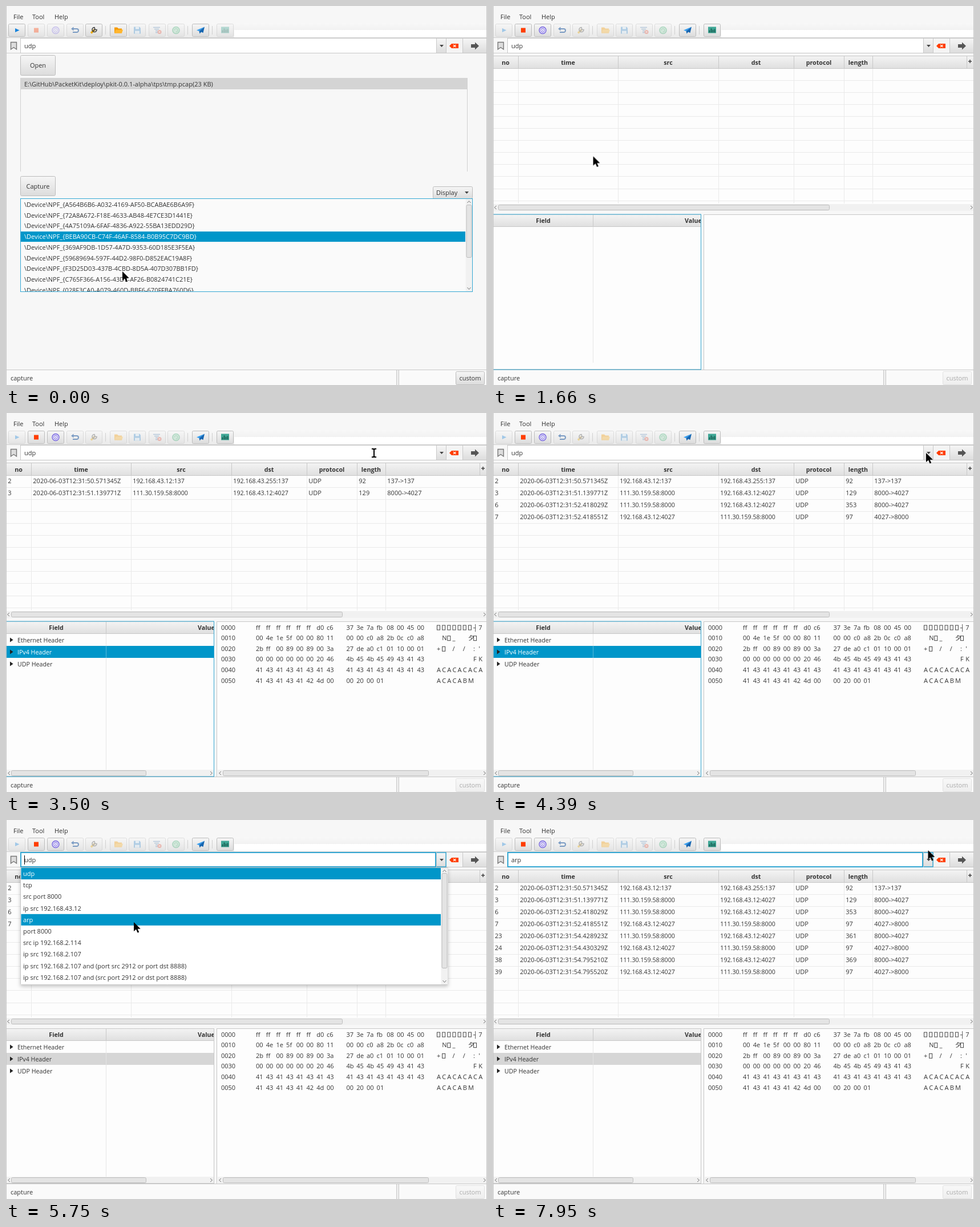
An HTML page for the animation above (8000 ms loop, 843 by 664 pixels).

```html
<!DOCTYPE html>
<html lang="en">
<head>
<meta charset="utf-8">
<title>Packet capture</title>
<style>
html, body { margin: 0; width: 100%; height: 100%; overflow: hidden; background: #f7f7f7; }
svg { display: block; }
text { font: 11px "Open Sans", "Noto Sans", sans-serif; fill: #333; white-space: pre; }
.bold { font-weight: 700; font-size: 10.7px; }
.ip, .tree { font-size: 10.65px; }
.inv { fill: #fff; }
.mid { text-anchor: middle; }
.dim { opacity: .4; }
</style>
</head>
<body>
<svg id="stage" width="843" height="664" viewBox="0 0 843 664" xmlns="http://www.w3.org/2000/svg"></svg>
<script>
const LOOP = 8000, STEP = 120, BLUE = '#0096c9', FOCUS = '#35a8d4', LINE = '#c8c8c8';

// drawing helpers, all return SVG markup
const box = (x, y, w, h, fill, more = '') => `<rect x="${x}" y="${y}" width="${w}" height="${h}" fill="${fill}" ${more}/>`;
const frame = (x, y, w, h, fill, stroke = LINE, r = 0) =>
  box(x + .5, y + .5, w - 1, h - 1, fill, `stroke="${stroke}" rx="${r}"`);
const path = (d, fill = 'none', more = '') => `<path d="${d}" fill="${fill}" ${more}/>`;
const line = (d, color, w = 1) => path(d, 'none', `stroke="${color}" stroke-width="${w}"`);
const disc = (r, fill, more = '') => `<circle r="${r}" fill="${fill}" ${more}/>`;
const label = (x, y, s, cls = '') => `<text x="${x}" y="${y + 4}" class="${cls}">${s}</text>`;
const group = (s, more = '') => `<g ${more}>${s}</g>`;
const at = (x, y, s) => group(s, `transform="translate(${x} ${y})"`);
const clip = (x, y, w, h, s) => `<svg x="${x}" y="${y}" width="${w}" height="${h}" viewBox="${x} ${y} ${w} ${h}">${s}</svg>`;
const button = (x, y, w, h, s = '') => frame(x, y, w, h, 'url(#face)', '#bcbcbc', 2) +
  (s && label(x + w / 2, y + h / 2, s, 'mid'));
const chevron = (x, y, turn) => path('M-2 -3L1.5 0L-2 3', 'none',
  `stroke="#777" transform="translate(${x} ${y}) rotate(${turn})"`);
const thumb = (x, y, w, h) => frame(x, y, w, h, '#e4e4e4', '#bdbdbd', 2);
const hbar = (x, y, w, from, to) => box(x, y, w, 12, '#f1f1f1') + chevron(x + 4, y + 6, 180) +
  chevron(x + w - 4, y + 6, 0) + thumb(from, y + 1, to - from, 10);
const vbar = (x, y, h, from, to) => box(x, y, 12, h, '#f1f1f1') + chevron(x + 6, y + 5, -90) +
  chevron(x + 6, y + h - 5, 90) + thumb(x + 1, from, 10, to - from);
const fade = (id, a, b) => `<linearGradient id="${id}" x2="0" y2="1"><stop stop-color="${a}"/><stop offset="1" stop-color="${b}"/></linearGradient>`;

const defs = '<defs>' + fade('face', '#f6f6f6', '#dcdcdc') + fade('head', '#f3f3f3', '#e0e0e0') +
  fade('bar', '#f8f8f8', '#eaeaea') + `<filter id="shadow" x="-5%" y="-5%" width="110%" height="115%">
  <feDropShadow dx="0" dy="3" stdDeviation="3" flood-opacity=".22"/></filter></defs>`;

// toolbar icons, centred on 0,0
const play = path('M-3 -3.5L4.5 0L-3 3.5Z', '#1583dc');
const stop = box(-4, -4, 8, 8, '#ff3d00');
const rings = disc(6, '#e3defc', 'stroke="#7564dd" stroke-width="1.4"') + disc(3.2, '#fff', 'stroke="#7564dd"') + disc(1, '#7564dd');
const undo = line('M-4 -2.5H3a3 3 0 0 1 0 6H-4', '#3f71ad', 2) + path('M-7 -2.5L-2.5 -6V1Z', '#3f71ad');
const wrench = line('M-5 5L1 -1', '#e9a800', 3.4) + line('M-2 2L2 -2M1 -5a4 4 0 1 0 4 4L2 -1Z', '#444', 1.6);
const folder = path('M-7 -5H-2L0 -3H6V5H-7Z', '#f59a00') + path('M-7 5L-5 -1H8L6 5Z', '#ffb62e');
const save = path('M-6 -6H4L6 -4V6H-6Z', '#3d8fd1') + box(-3, -6, 6, 4, '#d8ecfa') + box(-4, 1, 8, 5, '#d8ecfa');
const clear = line('M-7 -5H5M-5 -2H3M-3 1H1M-3 4H1', '#4a7fb5', 1.6) +
  at(4, 3, disc(3.5, '#e5533d') + line('M-1.5 -1.5L1.5 1.5M1.5 -1.5L-1.5 1.5', '#fff'));
const reload = disc(6, '#9fdcb8', 'stroke="#35a86b" stroke-width="1.6"') + line('M-3 0A3 3 0 1 1 0 3', '#35a86b');
const plane = path('M7 -6L-7 0L-2.5 1.6Z', '#2f9bf0') + path('M7 -6L-2.5 1.6L-1.5 6L1 3L4.5 4.5Z', '#1565b0');
const chart = box(-7, -6, 14, 11, '#3fa796') + line('M-4.5 4V0M-1.5 4V-3M1.5 4V-1M4.5 4V-2', '#14574c', 1.6);

const tools = [play, stop, rings, undo, wrench, folder, save, clear, reload, plane, chart];
const toolX = [4, 38, 72, 106, 139, 182, 215, 250, 283, 326, 369];
const toolbar = (...on) => tools.map((icon, i) => {
  const live = on.includes(icon);
  return group(button(toolX[i], 31, 30, 23), live ? '' : 'opacity=".45"') +
    group(at(toolX[i] + 15, 42.5, icon), live ? '' : `opacity="${icon == undo ? .65 : .35}"`);
}).join('');

const chrome = box(0, 0, 843, 664, '#f7f7f7') +
  label(13, 18.5, 'File') + label(46, 18.5, 'Tool') + label(85, 18.5, 'Help') +
  box(0, 30, 843, 25, 'url(#bar)') + box(400, 42, 443, 13, '#fff') +
  [174, 318, 361].map(x => box(x, 35, 1, 15, '#d0d0d0')).join('');

const filterRow = box(0, 55, 843, 1, '#cfcfcf') + box(0, 82, 843, 1, '#cfcfcf') +
  path('M8.5 63.5H18.5V76L13.5 72.5L8.5 76Z', '#ddd', 'stroke="#777" stroke-width="1.4"') +
  frame(25, 56, 730, 27, '#fff') + frame(754, 56, 18, 27, 'url(#face)') +
  path('M760 68H767L763.5 72Z', '#444') +
  frame(771, 56, 30, 27, '#f4f4f4') + path('M777 70L781 66H793V74H781Z', '#ff3d00') +
  line('M784 68L788.5 72M788.5 68L784 72', '#fff', 1.3) +
  frame(800, 56, 43, 27, 'url(#face)') +
  path('M815 67H822V63.5L829 70L822 76.5V73H815Z', '#555') +
  group(box(26, 57, 727, 25, 'none', `stroke="${FOCUS}" stroke-width="2"`) +
    line('M755 57H771V82H755', FOCUS, 1.4), 'id="focus"') +
  group(label(32, 70, 'udp'), 'id="udp"') + group(label(32, 70, 'arp'), 'id="arp"') +
  box(32, 62, 1, 16, '#000', 'id="caret"');

const status = box(0, 637, 843, 1, LINE) + box(0, 638, 843, 26, '#fafafa') + label(8, 651.5, 'capture') +
  box(684, 638, 5, 26, '#eee') + box(684, 638, 1, 26, LINE) + box(688, 638, 1, 26, LINE);

// start view
const devices = ['A564B6B6-A032-4169-AF50-BCABAE6B6A9F', '72A8A672-F18E-4633-AB48-4E7CE3D1441E',
  '4A75109A-6FAF-4836-A922-55BA13EDD29D', 'BEBA90CB-C74F-46AF-8584-B0B95C7DC9BD',
  '369AF9DB-1D57-4A7D-9353-60D185E3F5EA', '59689694-597F-44D2-98F0-D852EAC19A8F',
  'F3D25D03-437B-4CBD-8D5A-407D307BB1FD', 'C765F366-A156-43D7-AF26-B0824741C21E',
  '028F3CA0-A079-460D-BBF6-670FFBA760D6'].map(id => `\\Device\\NPF_{${id}}`);
const deviceY = i => 348 + i * 18.7;
const picked = i => group(box(26, deviceY(i) - 9, 779, 18, BLUE) + label(32, deviceY(i), devices[i], 'inv'), `id="pick${i}"`);

const startView = toolbar(play, wrench, folder, plane) + button(25, 86, 62, 36, 'Open') +
  box(25, 126, 784, 20, '#d4d4d4') + label(32, 136.5, 'E:\\GitHub\\PacketKit\\deploy\\pkit-0.0.1-alpha\\tps\\tmp.pcap(23 KB)') +
  box(25, 146, 1, 144, '#d0d0d0') + box(808, 146, 1, 144, '#d0d0d0') +
  button(25, 298, 62, 35, 'Capture') + button(748, 316, 70, 22) + label(754, 327, 'Display') +
  path('M804 325H811L807.5 329Z', '#444') +
  box(25, 338, 793, 162, '#fafafa') +
  clip(25, 338, 793, 162, devices.map((d, i) => label(32, deviceY(i), d)).join('') + picked(3) + picked(7)) +
  vbar(805.5, 338, 162, 348, 441) + frame(25, 337, 793, 164, 'none', FOCUS) +
  button(788, 640, 51, 24, 'custom');

// capture view
const cols = [0, 44, 219, 395, 527, 615, 665, 830];
const names = ['no', 'time', 'src', 'dst', 'protocol', 'length'];
const A = '192.168.43.12', B = '111.30.159.58:8000', C = A + ':4027';
const up = [C, B, 97, '4027->8000'];
const down = size => [B, C, size, '8000->4027'];
const packets = [
  [2380, 2, '50.571345', A + ':137', '192.168.43.255:137', 92, '137->137'],
  [3010, 3, '51.139771', ...down(129)],
  [4250, 6, '52.418029', ...down(353)],
  [4250, 7, '52.418551', ...up],
  [6150, 23, '54.428923', ...down(361)],
  [6150, 24, '54.430329', ...up],
  [6150, 38, '54.795210', ...down(369)],
  [6150, 39, '54.795520', ...up]
];
const row = ([, no, sec, src, dst, len, info], i) => {
  const cells = [no, `2020-06-03T12:31:${sec}Z`, src, dst, 'UDP', len, info];
  return group(cells.map((s, c) => label(cols[c] + 3.3, 118.5 + i * 21.1, s, c == 2 || c == 3 ? 'ip' : '')).join(''), `id="row${i}"`);
};

let table = box(0, 87, 843, 272, '#fdfdfd') + box(0, 88, 843, 21, 'url(#head)') +
  box(0, 87, 843, 1, LINE) + box(0, 109, 843, 1, LINE);
for (let i = 1; i < 12; i++) table += box(0, 109 + Math.round(i * 21.05), 843, 1, '#eaeaea');
cols.slice(1).forEach((x, i) => {
  table += box(x, 88, 1, 21, LINE);
  if (i < 6) table += box(x, 110, 1, 236, '#eaeaea');
});
names.forEach((s, i) => table += label((cols[i] + cols[i + 1]) / 2, 98.5, s, 'bold mid'));
table += line('M833 97H839M836 94V100', '#444', 1.5) + packets.map(row).join('') + hbar(0, 347, 843, 9, 590);

const fields = ['Ethernet Header', 'IPv4 Header', 'UDP Header'];
const fieldY = i => 397.5 + i * 21;
const split = (fill, cls) => box(1, 408, 363, 21, fill) + box(175, 408, 1, 21, '#fff', 'opacity=".35"') + label(20, fieldY(1), fields[1], cls);
const tree = box(0, 365, 365, 272, '#fdfdfd') + box(0, 366, 365, 20, 'url(#head)') + box(0, 386, 365, 1, LINE) +
  box(175, 366, 1, 20, LINE) + box(175, 387, 1, 238, '#e6e6e6') + label(88, 376, 'Field', 'bold mid') +
  clip(176, 366, 188, 20, label(336, 376, 'Value', 'bold')) +
  group(fields.map((s, i) => label(20, fieldY(i), s, 'tree')).join('') +
    group(split('#d6d6d6', 'tree'), 'id="idle"') + group(split(BLUE, 'tree inv'), 'id="hot"') +
    fields.map((s, i) => at(7, fieldY(i), path('M0 -4L5.5 0L0 4Z', '#222'))).join('') +
    hbar(1, 625, 363, 9, 246), 'class="filled"') +
  frame(0, 365, 365, 272, 'none') + group(frame(0, 364.5, 365, 273, 'none', FOCUS), 'id="treeFocus"');

// '#' stands for an unprintable byte
const AC = '41 43 41 43 41 43 41 43';
const hexLine = (i, left, right, chars) => {
  const y = 375.5 + i * 18.65;
  const bytes = (s, x) => s.split(' ').map((b, k) => label(x + k * 17.7, y, b)).join('');
  return label(377, y, `00${i}0`) + bytes(left, 438) + bytes(right, 596.5) + [...chars].map((c, k) => {
    const x = 755 + k * 9.15;
    return c == '#' ? frame(x, y - 4, 6, 9, 'none', '#444') : c == ' ' ? '' : label(x, y, c);
  }).join('');
};
const dump = hexLine(0, 'ff ff ff ff ff ff d0 c6', '37 3e 7a fb 08 00 45 00', '#######┤7') +
  hexLine(1, '00 4e 1e 5f 00 00 80 11', '00 00 c0 a8 2b 0c c0 a8', ' N#_  夕#') +
  hexLine(2, '2b ff 00 89 00 89 00 3a', '27 de a0 c1 01 10 00 01', "+# / / :'") +
  hexLine(3, '00 00 00 00 00 00 20 46', '4b 45 4b 45 49 43 41 43', '       FK') +
  hexLine(4, AC, AC, 'ACACACACA') +
  hexLine(5, '41 43 41 43 41 42 4d 00', '00 20 00 01', 'ACACABM');
const hex = frame(369, 365, 475, 273, '#fdfdfd') + group(dump + hbar(371, 625, 472, 380, 741), 'class="filled"');

const captureView = toolbar(stop, rings, plane, chart) + table + tree + hex +
  group(button(788, 640, 51, 24, 'custom'), 'class="dim"');

// filter history
const filters = ['udp', 'tcp', 'src port 8000', 'ip src 192.168.43.12', 'arp', 'port 8000', 'src ip 192.168.2.114',
  'ip src 192.168.2.107', 'ip src 192.168.2.107 and (port src 2912 or port dst 8888)',
  'ip src 192.168.2.107 and (src port 2912 or dst port 8888)'];
const filterY = i => 94 + i * 20.2;
const lit = i => group(box(26.5, filterY(i) - 10, 735.5, 20, BLUE) + label(30, filterY(i), filters[i], 'inv'), `id="lit${i}"`);
const popup = group(frame(25, 83, 750, 206, '#fff', LINE, 1), 'filter="url(#shadow)"') +
  filters.map((s, i) => label(30, filterY(i), s)).join('') + [0, 1, 2, 3, 4].map(lit).join('') +
  vbar(762.5, 84, 204, 93, 260);

const cursor = group(path('M0 0V16L4 12.5L6.6 18.6L9.2 17.5L6.6 11.7H11.8Z', '#000') +
    at(3, 5.5, disc(2.6, '#f4683c', 'id="press"')), 'id="arrow"') +
  group(line('M-4 -7Q0 -8 0 -5Q0 -8 4 -7M0 -6V6M-4 7Q0 8 0 5Q0 8 4 7', '#000', 2), 'id="beam"');

const stage = document.getElementById('stage');
stage.innerHTML = defs + chrome + status + group(startView, 'id="start"') + group(captureView, 'id="capture"') +
  filterRow + group(popup, 'id="popup"') + box(0, 0, 1, 664, LINE) + box(842, 0, 1, 664, LINE) +
  group(cursor, 'id="cursor"');

// stepped track: table of [time, value], first entry at 0
function track(el, prop, steps) {
  const frames = [...steps, [LOOP, steps[steps.length - 1][1]]];
  el.animate(frames.map(([t, v]) => ({ offset: t / LOOP, [prop]: v, easing: 'step-end' })),
    { duration: LOOP, iterations: Infinity });
}
// visible between pairs of times
function show(sel, ...times) {
  const steps = times.map((t, i) => [t, i % 2 ? 0 : 1]);
  if (times[0] > 0) steps.unshift([0, 0]);
  stage.querySelectorAll(sel).forEach(el => track(el, 'opacity', steps.filter(s => s[0] < LOOP)));
}

show('#pick3', 0, 800);
show('#pick7', 800, LOOP);
show('#start', 0, 1300);
show('#capture', 1300, LOOP);
show('.filled', 2380, LOOP);
packets.forEach((p, i) => show('#row' + i, p[0], LOOP));
show('#hot, #treeFocus', 0, 4670);
show('#idle, #focus', 4670, LOOP);
show('#popup', 4670, 6030);
show('#lit1', 4910, 5150);
show('#lit2', 5150, 5270);
show('#lit3', 5270, 5630);
show('#lit4', 5630, LOOP);
show('#udp', 0, 6030);
show('#arp', 6030, LOOP);
show('#caret', 5510, 6150, 6570, 7050, 7350, 7830);
show('#beam', 2140, 4250);
show('#arrow', 0, 2140, 4250, LOOP);
show('#press', 1050, 1300, 5030, 5150);

// pointer: each leg spreads its points evenly over start..end, sampled every STEP
const moves = [];
function leg(start, end, ...pts) {
  for (let t = start; t <= end; t += STEP) {
    const p = end > start ? (t - start) / (end - start) * (pts.length - 1) : 0;
    const i = Math.floor(p), a = pts[i], b = pts[i + 1] || a;
    const [x, y] = a.map((v, k) => v + (b[k] - v) * (p - i));
    moves.push([t, `translate(${x}px, ${y}px)`]);
  }
}
leg(0, 0, [204, 465]);
leg(250, 250, [192, 475]);
leg(390, 390, [187, 477.5]);
leg(1300, 2140, [186, 462], [182, 372], [173, 220], [166, 125], [160, 65]);
leg(2260, 2740, [161, 70], [162, 75], [185, 74], [228, 72], [285, 70]);
leg(2890, 3250, [360, 70], [638, 70]);
leg(3500, 4100, [645, 70], [753, 70]);
leg(4250, 4250, [756, 70.5]);
leg(4390, 4390, [759, 70]);
leg(4670, 5390, [757, 73], [728, 84], [660, 102], [580.5, 117], [488, 130], [396, 146], [318, 155]);
leg(5510, 5750, [264, 162], [234, 173], [224, 179]);
leg(6430, 6430, [277, 164]);
leg(6570, 7050, [345, 164], [500, 170], [588, 175]);
leg(7200, 7200, [589, 176.5]);
leg(7350, 7950, [604, 168], [640, 144], [688, 108], [738, 70], [773, 48], [762.5, 53]);
track(document.getElementById('cursor'), 'transform', moves);
</script>
</body>
</html>
```
